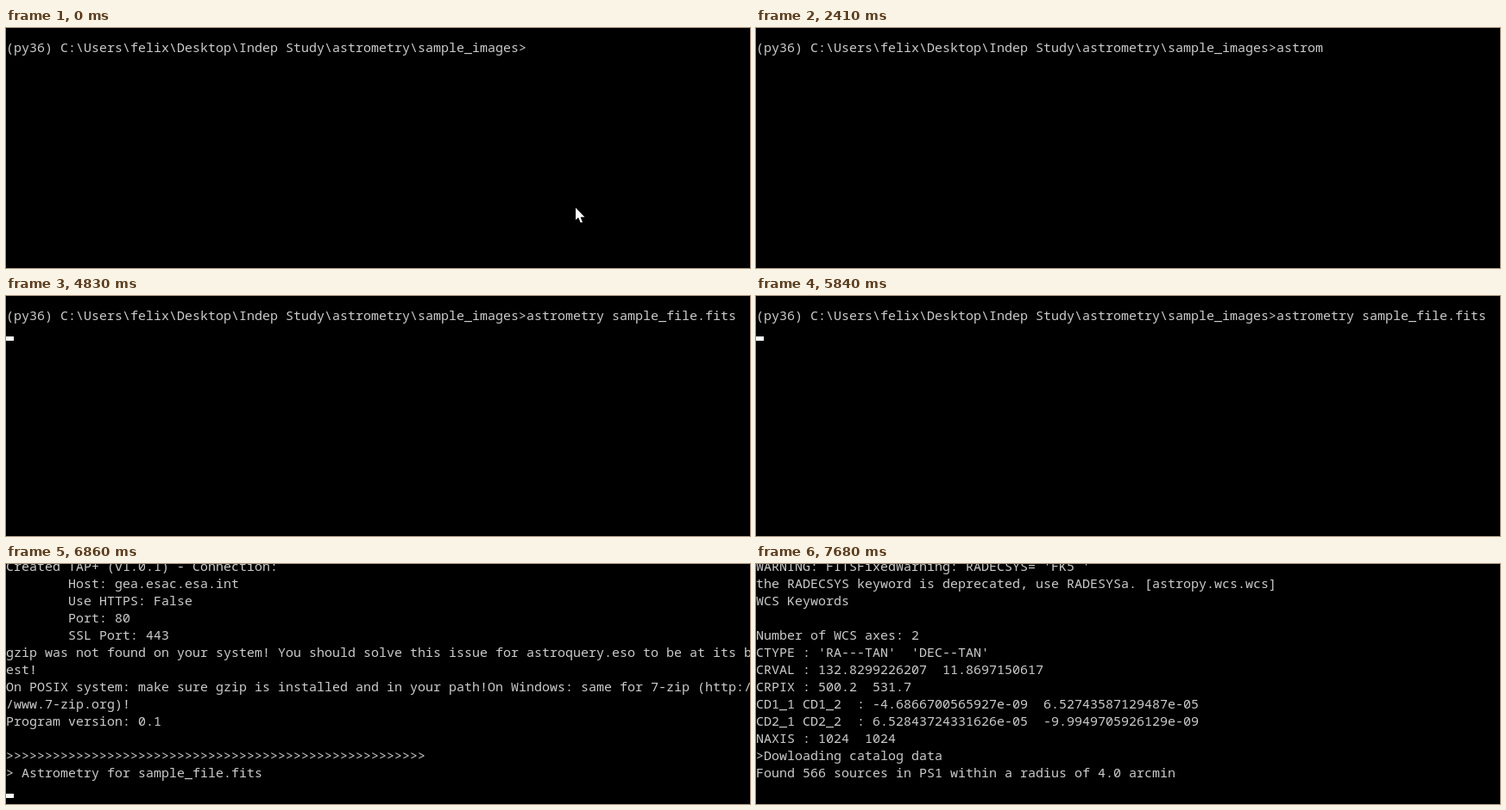
Write an HTML page that moves like this. It is 862 px wide and 279 px high and loops after 8000 ms.

```html
<!DOCTYPE html>
<html lang="en">
<head>
<meta charset="utf-8">
<title>Terminal session</title>
<style>
  html, body { margin: 0; width: 100%; height: 100%; overflow: hidden; background: #000; }
  #stage { position: relative; width: 862px; height: 279px; overflow: hidden; background: #000; }
  #screen {
    position: absolute; left: 0; top: -8px; margin: 0; white-space: pre;
    font: 15px/20px "Noto Sans Mono", "DejaVu Sans Mono", monospace;
    font-variant-ligatures: none; color: #ccc;
  }
  #caret { position: absolute; left: 0; top: 0; width: 9px; height: 5px; background: #fff; }
  #pointer { position: absolute; left: 0; top: 0; width: 11px; height: 18px; fill: #fff; }
</style>
</head>
<body>
<div id="stage">
  <pre id="screen"></pre>
  <div id="caret"></div>
  <svg id="pointer" viewBox="0 0 11 18"><path d="M0 0V14L3.2 11.2L5.6 17H8L5.6 10.8H10.4Z"/></svg>
</div>
<script>
const LOOP = 8000, CELL = 9, ROW = 20, ROWS = 14;
const screen = document.getElementById('screen');
const caret = document.getElementById('caret');
const pointer = document.getElementById('pointer');

const prompt = String.raw`(py36) C:\Users\felix\Desktop\Indep Study\astrometry\sample_images>`;
const command = 'astrometry sample_file.fits';

const connection = [
  'Created TAP+ (v1.0.1) - Connection:',
  ...['Host: gea.esac.esa.int', 'Use HTTPS: False', 'Port: 80', 'SSL Port: 443']
    .map(line => ' '.repeat(8) + line),
];
const gzip = [
  'gzip was not found on your system! You should solve this issue for astroquery.eso to be at its b',
  'est!',
  'On POSIX system: make sure gzip is installed and in your path!On Windows: same for 7-zip (http:/',
  '/www.7-zip.org)!',
];
const header = ['Program version: 0.1', '', '>'.repeat(54), '> Astrometry for sample_file.fits'];
const info = ['>Info found in the file -- (CRVAl: position of central pixel (CRPIX) on the sky)'];
const keywords = [
  "WARNING: FITSFixedWarning: RADECSYS= 'FK5 '",
  'the RADECSYS keyword is deprecated, use RADESYSa. [astropy.wcs.wcs]',
  'WCS Keywords',
  '',
  'Number of WCS axes: 2',
  "CTYPE : 'RA---TAN'  'DEC--TAN'",
  'CRVAL : 132.8299226207  11.8697150617',
  'CRPIX : 500.2  531.7',
  'CD1_1 CD1_2  : -4.6866700565927e-09  6.52743587129487e-05',
  'CD2_1 CD2_2  : 6.52843724331626e-05  -9.9949705926129e-09',
  'NAXIS : 1024  1024',
  '>Dowloading catalog data',
  'Found 566 sources in PS1 within a radius of 4.0 arcmin',
];

const typed = (count, on = false, arrow = null) =>
  ({ lines: ['', prompt + command.slice(0, count)], on, arrow });
const output = (on, ...blocks) =>
  ({ lines: ['', prompt + command, ...blocks.flat(), ''], on, arrow: null });

// Each state holds from its start time until the next one.
const states = [
  [0, typed(0, false, [660, 209])],
  [200, typed(0, false, [643, 196])],
  [580, typed(0, false, [646, 182])],
  [780, typed(0, true)],
  [980, typed(0)],
  [1180, typed(0, true)],
  [1600, typed(2)],
  [2000, typed(3)],
  [2200, typed(4)],
  [2400, typed(6)],
  [2600, typed(7)],
  [2800, typed(9)],
  [3010, typed(10, true)],
  [3200, typed(10)],
  [3620, typed(12)],
  [3820, typed(13)],
  [4010, typed(27, true)],
  [4210, typed(27)],
  [4830, output(true)],
  [5430, output(false)],
  [5840, output(true)],
  [6240, output(true, connection)],
  [6440, output(true, connection, gzip)],
  [6860, output(true, connection, gzip, header)],
  [7460, output(false, connection, gzip, header, info)],
  [7680, output(false, connection, gzip, header, info, keywords)],
];

const place = (el, x, y) => { el.style.transform = `translate(${x}px, ${y}px)`; };
const show = (el, visible) => { el.style.visibility = visible ? 'visible' : 'hidden'; };

function render({ lines, on, arrow }) {
  const view = lines.slice(-ROWS);
  const row = view.length - 1;
  screen.textContent = view.join('\n');
  place(caret, view[row].length * CELL, row * ROW + 7);
  show(caret, on);
  if (arrow) place(pointer, ...arrow);
  show(pointer, arrow);
}

const start = performance.now();
let current = null;
function tick() {
  const time = (performance.now() - start) % LOOP;
  const [, state] = states.findLast(([from]) => from <= time);
  if (state !== current) render(current = state);
  requestAnimationFrame(tick);
}
tick();
</script>
</body>
</html>
```
